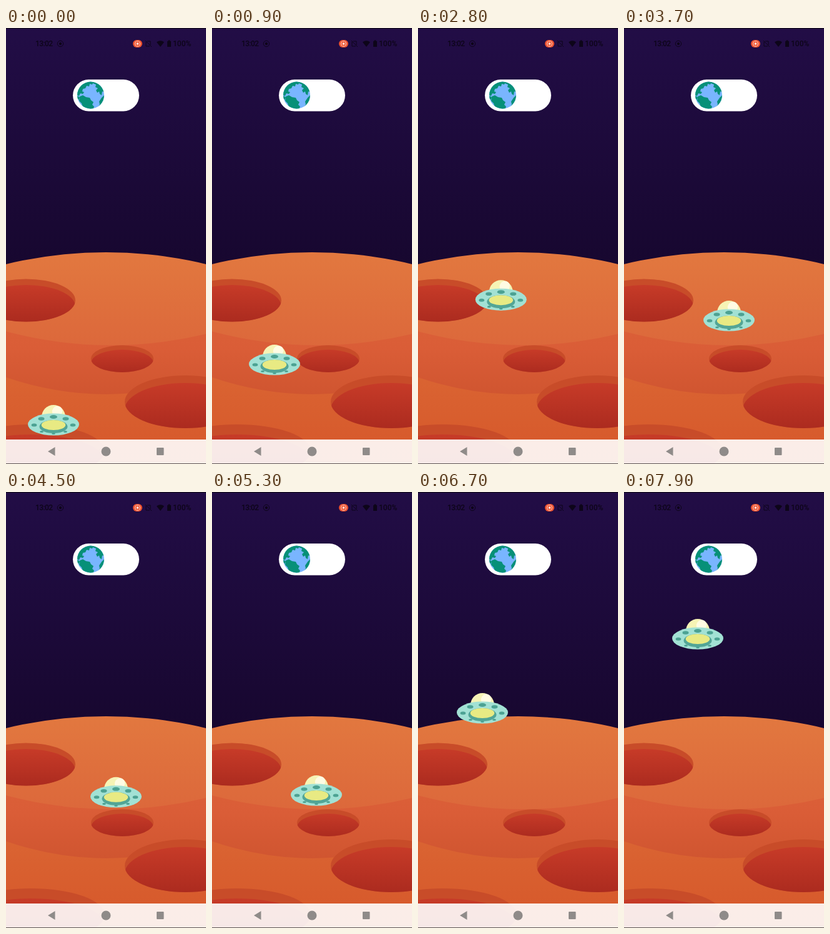
Write an HTML page that moves like this. It is 320x694 px and loops after 8 s.

```html
<!DOCTYPE html>
<html lang="en">
<head>
<meta charset="utf-8">
<title>Saucer over a red planet</title>
<style>
  html, body { margin: 0; width: 100%; height: 100%; overflow: hidden; background: #180830; }
  svg { display: block; width: 100%; height: 100%; }
  text { font: 500 12px Roboto, sans-serif; fill: #0d0519; }
</style>
</head>
<body>
<svg viewBox="0 0 320 694">
  <defs>
    <linearGradient id="sky" x2="0" y2="1"><stop stop-color="#220d46"/><stop offset="1" stop-color="#17072f"/></linearGradient>
    <linearGradient id="top" x2="0" y2="1"><stop stop-color="#e2783f"/><stop offset="1" stop-color="#dc683b"/></linearGradient>
    <linearGradient id="mid" x2="0" y2="1"><stop stop-color="#dc6439"/><stop offset=".6" stop-color="#da5d37"/><stop offset="1" stop-color="#d05530"/></linearGradient>
    <linearGradient id="low" x2="0" y2="1"><stop stop-color="#da6533"/><stop offset="1" stop-color="#d6572a"/></linearGradient>
    <linearGradient id="pit" x2="0" y2="1"><stop stop-color="#c73b28"/><stop offset=".85" stop-color="#ac2b1f"/></linearGradient>
    <clipPath id="planet"><circle cx="160" cy="1040" r="683"/></clipPath>
    <clipPath id="globe"><circle cx="135.5" cy="107" r="21.5"/></clipPath>
  </defs>

  <rect width="320" height="380" fill="url(#sky)"/>
  <rect width="320" height="1" fill="#0b0712"/>

  <g clip-path="url(#planet)">
    <rect y="540" width="320" height="154" fill="url(#low)"/>
    <path d="M0 400H320V556Q160 610 0 556Z" fill="url(#mid)"/>
    <path d="M0 357H320V487Q160 525 0 483Z" fill="url(#top)"/>
    <g id="craters"></g>
  </g>

  <g id="status" fill="none" stroke="#0d0519">
    <text x="47" y="29" stroke="none" textLength="28">13:02</text>
    <circle cx="87" cy="25" r="4.7"/>
    <circle cx="87" cy="25" r="1.7" fill="#0d0519"/>
    <rect x="203" y="19" width="15" height="12" rx="6" fill="#ef5330" stroke="none"/>
    <circle cx="210.500" cy="25" r="1.700" fill="#fff" stroke="none"/>
    <path d="M207.500 21.500q-2 3.500 0 7m6-7q2 3.500 0 7M208.500 21h4m-4 8h4" stroke="#fbd5c9"/>
    <path d="M224 22v7h6M226 21h5v6M223 20l10 10"/>
    <path d="M241 22.500q6-4.500 12 0l-6 7.500z" fill="#0d0519" stroke="none"/>
    <path d="M258 21h1.500v-1.500h3V21h1.500v9h-6z" fill="#0d0519" stroke="none"/>
    <text x="267" y="29" stroke="none">100%</text>
  </g>

  <rect x="107" y="82" width="106" height="50.500" rx="25.200" fill="#fff"/>
  <g clip-path="url(#globe)" fill="#079078">
    <rect x="113" y="85" width="45" height="45" fill="#79b5ff"/>
    <path d="M113 107V94l9-8 10-2 8 2-2 4-4-1-1 4-4-1-2 4-4 1-1 4 3 1-2 3-4-1-2 4z"/>
    <path d="M139 84l8 2 8 7 3 9-4-1-1 6-3-2-1-4-3 2-2-4 3-3-4-2 1-4-5-2z"/>
    <path d="M118 109l5-2 5 3 6 1 2 4 4 3-2 4 3 3-2 5-9 1-7-5-2-6-4-4z"/>
    <path d="M158 106l-5 5-4 6 1 5-3 4 8-3 4-10z"/>
    <path d="M114 108l4 2-1 4-3-1z"/>
  </g>

  <g id="ufo">
    <circle cy="-12" r="19" fill="#f6f3b5"/>
    <ellipse cx="6" cy="-21" rx="8" ry="8.500" fill="#fffbe3" transform="rotate(35 6 -21)"/>
    <ellipse rx="41" ry="17.500" fill="#a2e1d4"/>
    <ellipse cy="3.500" rx="22.500" ry="10.500" fill="#52a596"/>
    <ellipse cy="1" rx="19.300" ry="8" fill="#e8ea83"/>
    <g id="ports" fill="#4ca293"></g>
  </g>

  <rect y="655" width="320" height="39" fill="#fff" opacity=".89"/>
  <g fill="#8f8b89">
    <path d="M67 674l11.500-7v14z"/>
    <circle cx="160" cy="674" r="7.500"/>
    <rect x="241" y="668" width="11.500" height="12" rx="1"/>
  </g>
  <rect y="693" width="320" height="1" fill="#5c5553"/>
</svg>
<script>
const el = id => document.getElementById(id);
const oval = (x, y, rx, ry, extra = '') => `<ellipse cx="${x}" cy="${y}" rx="${rx}" ry="${ry}" ${extra}/>`;

// x, y, rx, ry, depth of the shaded rim
const craters = [[32, 433.5, 79, 34, 9.5], [186, 526.5, 50, 21.5, 7], [287, 595, 97, 42, 12], [40, 673, 118, 42, 16]];
el('craters').innerHTML = craters.map(([x, y, rx, ry, rim], i) =>
  `<clipPath id="rim${i}">${oval(x, y, rx, ry)}</clipPath>` +
  oval(x, y, rx, ry, 'fill="#c84c29"') +
  `<g clip-path="url(#rim${i})">${oval(x, y + rim, rx, ry, 'fill="url(#pit)"')}</g>`).join('');

const ports = [[0, -12, 6, 3], [19.5, -9, 5, 2.8], [31, 1, 4.4, 2.5], [19, 11.5, 2.9, 1.6], [0, 14.5, 2.8, 1.5]];
el('ports').innerHTML = ports.map(([x, y, rx, ry]) =>
  oval(x, y, rx, ry) + (x ? oval(-x, y, rx, ry) : '')).join('');

// Flight path: time, x, y
const path = [[0, 76, 631], [900, 100, 535], [1900, 96, 419], [3700, 168, 465],
              [5300, 167, 482], [6700, 103, 351], [7900, 118, 233]];

function slope(i, k) {
  const a = path[Math.max(i - 1, 0)], b = path[Math.min(i + 1, path.length - 1)];
  return (b[k] - a[k]) / (b[0] - a[0]);
}

// Cubic Hermite curve between neighbouring points
function at(t, k) {
  let i = 0;
  while (i < path.length - 2 && t >= path[i + 1][0]) i++;
  const a = path[i], b = path[i + 1], d = b[0] - a[0], u = (t - a[0]) / d, v = 1 - u;
  return v * v * ((1 + 2 * u) * a[k] + u * d * slope(i, k)) +
         u * u * ((1 + 2 * v) * b[k] - v * d * slope(i + 1, k));
}

const start = performance.now();
function draw() {
  const t = Math.floor((performance.now() - start) % 8000 / 100) * 100;
  el('ufo').setAttribute('transform', `translate(${at(t, 1)} ${at(t, 2)})`);
  requestAnimationFrame(draw);
}
draw();
</script>
</body>
</html>
```
